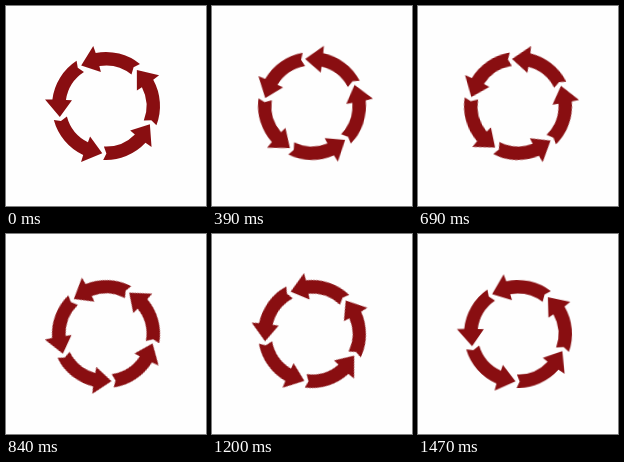
Write an HTML page that moves like this. It is 200x200 px and loops after 1.5 s.

```html
<!DOCTYPE html>
<html lang="en">
<head>
<meta charset="utf-8">
<title>Turning arrows</title>
<style>
  html, body { margin: 0; width: 100%; height: 100%; overflow: hidden; background: #fefefe; }
  svg { display: block; width: 100vw; height: 100vh; }
  #ring { fill: #890e11; animation: spin 1500ms steps(50, end) infinite; }
  @keyframes spin {
    from { transform: rotate(0deg); }
    to { transform: rotate(365.8deg); }
  }
</style>
</head>
<body>
<svg viewBox="-100 -100 200 200">
  <g id="ring"></g>
</svg>
<script>
  const COUNT = 5, TIP = 49.5, OUTER = 54, INNER = 40.5, MID = 47.5;

  // Polar point, angle counterclockwise from the right
  const at = (r, deg) => {
    const a = deg * Math.PI / 180;
    return `${(r * Math.cos(a)).toFixed(2)} ${(-r * Math.sin(a)).toFixed(2)}`;
  };

  // Angles run from the tip at 0 back to the notched tail
  const arrow = turn => {
    const p = (r, deg) => at(r, turn + deg);
    return `M${p(MID, 0)} L${p(61.3, -19.5)} L${p(OUTER, -20.5)}` +
      `A${OUTER} ${OUTER} 0 0 1 ${p(OUTER, -70.5)}` +
      `L${p(MID, -67)} L${p(INNER, -70.5)}` +
      `A${INNER} ${INNER} 0 0 0 ${p(INNER, -22)} L${p(34.5, -23)}Z`;
  };

  let d = '';
  for (let i = 0; i < COUNT; i++) d += arrow(TIP + i * 360 / COUNT);
  const path = document.createElementNS('http://www.w3.org/2000/svg', 'path');
  path.setAttribute('d', d);
  document.getElementById('ring').append(path);
</script>
</body>
</html>
```
